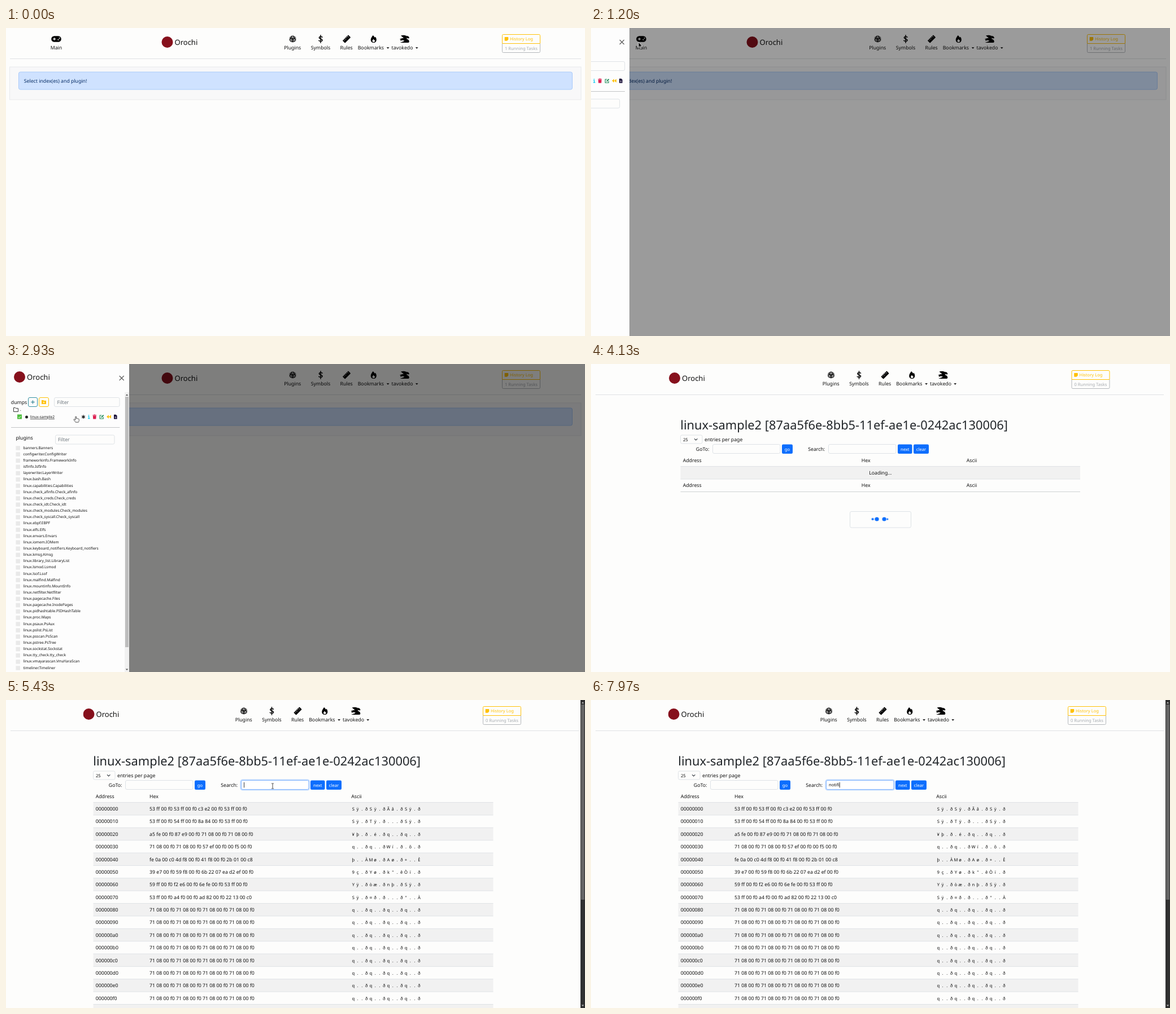
Write an HTML page that moves like this. It is 1025 px wide and 546 px high and loops after 8000 ms.

```html
<!DOCTYPE html>
<html lang="en">
<head>
<meta charset="utf-8">
<title>Memory dump viewer</title>
<style>
  html, body { margin: 0; width: 100%; height: 100%; overflow: hidden; background: #fdfdfc; }
  svg { display: block; width: 1025px; height: 546px; }
  text { font: 8.73px "Noto Sans", sans-serif; fill: #111; white-space: pre; text-rendering: geometricPrecision; }
  .mid { text-anchor: middle; }
  .small { font-size: 7.64px; }
  .tiny { font-size: 6.55px; }
  .hint { fill: #6c757d; }
  .title { font-size: 21.83px; font-weight: 500; fill: #212529; }
  .brand { font-size: 13px; }
  .box { fill: #fdfdfc; stroke: #dee2e6; }
  .blue { fill: #0d6efd; }
  .white { fill: #fff; }
  .line { fill: none; stroke: #dfe2e5; }

  .step, .move { animation: 8s step-end infinite; }
  .move { animation-timing-function: linear; }
  .viewA { animation-name: viewA; }
  .viewB { animation-name: viewB; }
  .loading { animation-name: loading; }
  .loaded { animation-name: loaded; }
  .nudge { animation-name: nudge; }
  .checked { animation-name: checked; }
  .listed { animation-name: listed; }
  .aside { animation-name: aside; }
  .fit { animation-name: fit; }
  .main { animation-name: hover; }
  .shade { animation-name: shade; }
  .panel { animation-name: slide; }
  .focus { animation-name: focus; }
  .caret { animation-name: caret; }
  .key { animation-name: key; animation-delay: calc(var(--t) - 8s); }
  .pointer { animation-name: travel; }
  .arrow { animation-name: arrow; }
  .hand { animation-name: hand; }
  .beam { animation-name: beam; }
  .grow, .shrink { transform-box: fill-box; transform-origin: center; }
  .grow { animation-name: grow; }
  .shrink { animation-name: grow; animation-direction: normal; animation-name: shrink; }
  .hop { animation-name: hop; }

  @keyframes viewA { 0% { opacity: 1 } 45%, 100% { opacity: 0 } }
  @keyframes viewB { 0% { opacity: 0 } 45%, 100% { opacity: 1 } }
  @keyframes loading { 0% { opacity: 1 } 57.5%, 100% { opacity: 0 } }
  @keyframes loaded { 0% { opacity: 0 } 57.5%, 100% { opacity: 1 } }
  @keyframes nudge { 0% { transform: none } 57.5%, 100% { transform: translateX(var(--d)) } }
  @keyframes checked { 0% { opacity: 0 } 25.6%, 100% { opacity: 1 } }
  @keyframes listed { 0% { opacity: 0 } 29%, 100% { opacity: 1 } }
  @keyframes aside { 0% { transform: translateX(9px) } 29%, 100% { transform: none } }
  @keyframes fit { 0% { width: var(--w) } 29%, 100% { width: calc(var(--w) - 8.7px) } }
  @keyframes hover { 0%, 11.8% { opacity: 1 } 13.2%, 13.6% { opacity: .8 } 15%, 100% { opacity: 1 } }
  @keyframes shade { 0%, 13.56% { opacity: 0 } 15.44%, 100% { opacity: .5 } }
  @keyframes slide {
    0%, 13.56% { transform: translateX(-218px); animation-timing-function: ease-in-out }
    17.31%, 100% { transform: none }
  }
  @keyframes focus { 0%, 66.2% { opacity: 0 } 67.8%, 100% { opacity: 1 } }
  @keyframes caret {
    0% { opacity: 0; transform: none }
    66.25% { opacity: 1 }
    72.5% { opacity: 0 }
    78.75% { opacity: 1; transform: none }
    84.4% { transform: translateX(4.7px) }
    86.9% { transform: translateX(9.3px) }
    89.4% { transform: translateX(12.1px) }
    92.5% { transform: translateX(14.1px) }
    95.6% { transform: translateX(16.7px) }
    98.1%, 100% { opacity: 1; transform: translateX(18.7px) }
  }
  @keyframes key { 0% { fill-opacity: 1 } 16%, 100% { fill-opacity: 0 } }
  @keyframes travel {
    0%, 8% { transform: translate(150px, -25px); animation-timing-function: ease-in-out }
    12.4%, 18.5% { transform: translate(84px, 25px); animation-timing-function: ease-in-out }
    24.5%, 29% { transform: translate(24px, 94px); animation-timing-function: ease-in-out }
    36.2% { transform: translate(122px, 93px) }
    40%, 45% { transform: translate(137px, 93px) }
    45.01%, 59% { transform: translate(330px, -25px); animation-timing-function: ease-in-out }
    65.6%, 100% { transform: translate(472px, 152px) }
  }
  @keyframes arrow { 0% { opacity: 1 } 23.6% { opacity: 0 } 45% { opacity: 1 } 64.3%, 100% { opacity: 0 } }
  @keyframes hand { 0% { opacity: 0 } 23.6% { opacity: 1 } 45%, 100% { opacity: 0 } }
  @keyframes beam { 0% { opacity: 0 } 64.3% { opacity: 1 } 84.4%, 100% { opacity: 0 } }
  @keyframes grow {
    0%, 45.3%, 52.8% { transform: scale(0); animation-timing-function: cubic-bezier(0, 1, 1, 0) }
    52.79%, 60.3%, 100% { transform: none }
  }
  @keyframes shrink {
    0%, 45.3%, 52.8% { transform: none; animation-timing-function: cubic-bezier(0, 1, 1, 0) }
    52.79%, 60.3%, 100% { transform: scale(0) }
  }
  @keyframes hop {
    0%, 45.3%, 52.8% { transform: none; animation-timing-function: cubic-bezier(0, 1, 1, 0) }
    52.79%, 60.3%, 100% { transform: translateX(13.1px) }
  }
</style>
</head>
<body>
<svg viewBox="0 0 1025 546">
  <defs>
    <g id="logo">
      <circle cx="10" cy="16" r="10" fill="#86101c"/>
      <text class="brand" x="23" y="21">Orochi</text>
    </g>
    <g id="nav">
      <path d="M507.5 13l5.7 3.2v6.6l-5.7 3.2-5.7-3.2v-6.6z"/>
      <path d="M507.5 13v3l-3.2 5.6h6.4l-3.2-5.6M501.8 16.4l5.7-.4 5.7.4M501.8 22.6l2.5-1 3.2 4.4 3.2-4.4 2.5 1M501.8 16.4l2.5 5.2M513.2 16.4l-2.5 5.2" fill="none" stroke="#fdfdfc" stroke-width=".7"/>
      <path d="M560 16.2c-1.2-1.2-5.4-1.6-5.6.8-.2 2.700 5.800 1.800 5.600 4.800-.2 2.300-4.800 2-6.200.5M557 12.800v13.400" fill="none" stroke="#000" stroke-width="1.5" stroke-linecap="round"/>
      <g transform="rotate(-45 603 19.500)">
        <rect x="595.800" y="16.400" width="14.400" height="6.200" rx="1"/>
        <path d="M598.500 16.400v2.500M601.500 16.400v3.200M604.500 16.400v2.500M607.500 16.400v3.200" stroke="#fdfdfc" stroke-width=".8"/>
      </g>
      <path fill-rule="evenodd" d="M649.500 13c2 1.500 2.800 3 3.300 4l1-1.400c1.300 1.600 2 3.500 2 5.300 0 3-2.200 5.100-5 5.100s-5.100-2.100-5.100-5.100c0-2.400 2-5.300 3.800-7.900zM650.800 19.500c-1.400 1.500-2.300 2.400-2.300 3.500 0 1.200 1 1.900 2.300 1.900s2.400-.8 2.300-2.200c0-.6-.3-1.100-.5-1.500l-.8.9z"/>
      <path fill-rule="evenodd" d="M699 13.500c3-1 7-.8 9 .2l4 .8 2 2.600-.8 1.400-3.200-.4-1.200.9c3.300 1 5 2.700 5 5 0 1-.7 2-1.800 2h-14.400c3.400-1.700 6.700-2 7.700-3.600-3-1.200-5.800-.4-7.300.8l.8-2.700-2-.5c2.600-1.900 5-2.200 7.100-2.100-1.600-2.100-3.500-3.100-4.900-4.400zM709 15.400v.9h1.400z"/>
      <text class="mid" x="507.200" y="38.200">Plugins</text>
      <text class="mid" x="557" y="38.200">Symbols</text>
      <text class="mid" x="602.700" y="38.200">Rules</text>
      <text x="622.700" y="38.200">Bookmarks</text>
      <text x="682.500" y="38.200">tavokedo</text>
      <path d="M673.700 34.200h4.800l-2.400 2.600zM724.800 34.200h4.800l-2.400 2.600z"/>
    </g>
    <g id="status">
      <path d="M880.500 11.500h63a2 2 0 0 1 2 2v14h-67v-14a2 2 0 0 1 2-2z" fill="none" stroke="#ffc107"/>
      <path d="M878.500 27.500v14a2 2 0 0 0 2 2h63a2 2 0 0 0 2-2v-14" fill="none" stroke="#b3b7bb"/>
      <path d="M883.500 16h5a.8.800 0 0 1 .8.800v3.700l-2.300 2.300h-3.500a.8.800 0 0 1-.8-.8v-5.200a.8.800 0 0 1 .8-.8z" fill="#ffc107"/>
      <text class="small" x="892" y="22.300" style="fill:#ffc107">History Log</text>
    </g>
    <path id="tick" d="M21.800 94l1.500 1.500 3-3.200" fill="none" stroke="#fff"/>
  </defs>

  <g class="step viewA">
    <rect width="1025" height="546" fill="#fdfdfc"/>
    <path class="line" d="M7 54.500H1018"/>
    <g class="move main">
      <path fill-rule="evenodd" d="M85.500 14.200h7a5.300 5.300 0 0 1 0 10.600h-7a5.300 5.300 0 0 1 0-10.600zM84.900 17.200v1.600h-1.600v1.400h1.600v1.600h1.400v-1.600h1.600v-1.400h-1.600v-1.600zM92.400 19.700a1 1 0 0 0 0 2 1 1 0 0 0 0-2zM94.600 17.100a1 1 0 0 0 0 2 1 1 0 0 0 0-2z"/>
      <text class="mid" x="89" y="38.200">Main</text>
    </g>
    <use href="#logo" x="275.500" y="9"/>
    <use href="#nav"/>
    <use href="#status"/>
    <text class="small" x="883" y="38.900" style="fill:#a6abb0">1 Running Tasks</text>
    <rect x="6.500" y="69" width="1011.500" height="58" fill="#f8f8f9" stroke="#e8eaeb"/>
    <rect x="22.500" y="78" width="980" height="31" rx="3" fill="#cfe2ff" stroke="#a9cbfa"/>
    <text x="31.700" y="96.600" style="fill:#052c65">Select index(es) and plugin!</text>
    <rect class="move shade" width="1025" height="546"/>

    <g class="move panel">
      <rect width="218" height="546" fill="#fdfdfd"/>
      <use href="#logo" x="14" y="7"/>
      <path d="M200.700 21l8 8m0-8l-8 8" stroke="#555" stroke-width="1.100"/>
      <text x="8.800" y="70.600">dumps</text>
      <rect x="39.500" y="59.500" width="16" height="16" rx="2.500" fill="none" stroke="#3590a0"/>
      <path d="M44.200 67.500h6.600M47.500 64.200v6.600" stroke="#247b8c" stroke-width="1.100"/>
      <rect x="58.500" y="59.500" width="17" height="16" rx="2.500" fill="none" stroke="#ffc107"/>
      <path d="M63 64h3l1 1h4v6h-8z" fill="#ffc107"/>
      <path d="M67 66.400v3.200M65.400 68h3.200" stroke="#fff" stroke-width=".8"/>
      <rect class="box step fit" style="--w:124.200px" x="85.500" y="59.500" height="16" rx="2.500"/>
      <text class="hint" x="90.500" y="70.700">Filter</text>
      <path d="M13.500 77.500h3l1 1.200h4v5.800h-8z" fill="none" stroke="#222" stroke-width=".9"/>
      <text class="tiny" x="24.500" y="83.600">-</text>
      <rect x="20" y="89.500" width="8" height="8" fill="#e4e4e4"/>
      <g class="step checked">
        <rect x="20" y="89.500" width="8" height="8" fill="#4fbf3f"/>
        <use href="#tick"/>
      </g>
      <circle cx="36.500" cy="94" r="2.500" fill="#222"/>
      <text class="tiny" x="42.800" y="96.400" text-decoration="underline">linux-sample2</text>
      <g class="step aside">
        <path d="M137 90.300v6.800M134.100 92l5.800 3.400M139.900 92l-5.800 3.400" stroke="#111" stroke-width="1.200"/>
        <path d="M145.300 92.800h1.500v3.800m-1.700 0h3.400M146.500 90v1.500" fill="none" stroke="#0dcaf0" stroke-width="1.300"/>
        <path d="M153.400 90.200h2l.5-.7h1.700l.5.700h2v1h-6.700zM153.800 91.800h5.900l-.4 5.700h-5.100z" fill="#dc1f50"/>
        <path d="M169.500 91h-3.300v6h6v-3" fill="none" stroke="#198754" stroke-width="1.100"/>
        <path d="M168.300 95.200l.4-1.700 3.300-3.500 1.300 1.300-3.300 3.500z" fill="#198754"/>
        <path d="M182 90.300v6.400l-3.900-3.200zM186 90.300v6.400l-3.900-3.200z" fill="#ffc107"/>
        <path d="M191 89.800h3.600l2 2v5.700H191z" fill="#180f38"/>
        <path d="M193.800 92.600v3m-1.300-1.200l1.300 1.300 1.300-1.300" fill="none" stroke="#fff" stroke-width=".7"/>
      </g>
      <rect class="step fit" style="--w:201px" x="9" y="112" height="1" fill="#c2c4c6"/>
      <text x="17.500" y="134">plugins</text>
      <rect class="box step fit" style="--w:113.200px" x="87.500" y="126" height="16" rx="2.500"/>
      <text class="hint" x="92" y="137.200">Filter</text>
      <g class="step listed">
        <g id="plugins"></g>
        <rect x="210" y="50" width="8" height="496" fill="#f1f1f1"/>
        <rect x="211" y="58" width="6" height="444" fill="#bdbdbd"/>
        <path d="M211.700 56h4.600l-2.300-2.600zM211.700 540.500h4.600l-2.300 2.600z" fill="#555"/>
      </g>
    </g>
  </g>

  <g class="step viewB">
    <rect width="1025" height="546" fill="#fdfdfc"/>
    <path class="line" d="M8 54.500H1014"/>
    <g class="step nudge" style="--d:-1.500px"><use href="#logo" x="138" y="9"/></g>
    <g class="step nudge" style="--d:-4px"><use href="#nav" x="-82.500"/></g>
    <g class="step nudge" style="--d:-6.500px">
      <use href="#status" x="-27.500"/>
      <text class="small" x="855.500" y="38.900" style="fill:#a6abb0">0 Running Tasks</text>
    </g>
    <g class="step nudge" style="--d:-4px">
      <text class="title" x="158.300" y="115.600">linux-sample2 [87aa5f6e-8bb5-11ef-ae1e-0242ac130006]</text>
      <rect class="box" x="158.500" y="126" width="38.500" height="15" rx="2.500"/>
      <text class="small" x="163" y="136.500">25</text>
      <path d="M183 132.300l2.700 2.700 2.700-2.700" fill="none" stroke="#343a40" stroke-width="1.100"/>
      <text x="201" y="136.600">entries per page</text>
      <text x="185.800" y="153.600">GoTo:</text>
      <rect class="box" x="215.500" y="142.500" width="119.500" height="16" rx="2.500"/>
      <text x="384.200" y="153.600">Search:</text>
      <rect class="box" x="420.500" y="142.500" width="119.500" height="16" rx="2.500"/>
      <g class="move focus">
        <rect x="419.500" y="141.500" width="121.500" height="18" rx="3.500" fill="none" stroke="#c2dbfe" stroke-width="2.200"/>
        <rect x="420.500" y="142.500" width="119.500" height="16" rx="2.500" fill="#fff" stroke="#86b7fe"/>
      </g>
      <text id="query" class="small" x="425" y="153.400"></text>
      <rect class="step caret" x="425" y="145.800" width=".9" height="9.600" fill="#222"/>
      <g id="buttons"></g>
      <text x="162.700" y="173.700">Address</text>
    </g>
    <g class="step loading">
      <text x="478.800" y="173.700">Hex</text>
      <text x="664.800" y="173.700">Ascii</text>
      <rect x="158.500" y="181.500" width="707.500" height="22.500" fill="#f1f1f1"/>
      <path class="line" d="M158.500 181.500H866M158.500 204H866"/>
      <text class="mid" x="512.300" y="196">Loading...</text>
      <text x="162.700" y="218.400">Address</text>
      <text x="478.800" y="218.400">Hex</text>
      <text x="664.800" y="218.400">Ascii</text>
      <path d="M158.500 226.500H866" stroke="#cfd2d4"/>
      <rect class="box" x="458.500" y="261.500" width="108" height="28.500" rx="2.500"/>
      <g class="blue">
        <circle class="move grow" cx="498.600" cy="275" r="3.600"/>
        <circle class="move hop" cx="498.600" cy="275" r="3.600"/>
        <circle class="move hop" cx="511.700" cy="275" r="3.600"/>
        <circle class="move shrink" cx="524.800" cy="275" r="3.600"/>
      </g>
    </g>
    <g class="step loaded">
      <text x="254" y="173.700">Hex</text>
      <text x="611.300" y="173.700">Ascii</text>
      <g id="rows"></g>
      <rect x="1017" width="8" height="546" fill="#303030"/>
      <rect x="1018" y="8" width="6" height="346" fill="#656565"/>
      <path d="M1018.700 6h4.600l-2.300-2.600zM1018.700 540.500h4.600l-2.300 2.600z" fill="#bbb"/>
    </g>
  </g>

  <g class="move pointer">
    <path class="step arrow" d="M0 0v9.600l2.200-2 1.500 3.300 1.600-.7-1.500-3.200h3.100z" fill="#111" stroke="#fff" stroke-width=".7"/>
    <path class="step hand" d="M-.9.800c0-1.200 1.700-1.200 1.700 0v3c.3-.7 1.500-.6 1.700.1.500-.5 1.500-.3 1.600.5.700-.4 1.400.1 1.400.8v2c0 1.500-1 2-1 3h-5.200c-.4-1.500-2.300-2.500-3-4.500-.3-.9.700-1.300 1.400-.6l1.400 1.200z" fill="#fff" stroke="#222" stroke-width=".8"/>
    <path class="step beam" d="M-2-4h1.500l.5.400.5-.4H2M-2 5h1.500l.5-.4.5.4H2M0-3.600v8.200" fill="none" stroke="#333" stroke-width=".9"/>
  </g>
</svg>
<script>
  const fill = (id, parts) => { document.getElementById(id).innerHTML = parts.join(''); };
  const text = (x, y, str, cls = '') => `<text class="${cls}" x="${x}" y="${y}">${str}</text>`;

  const linux = `bash.Bash capabilities.Capabilities check_afinfo.Check_afinfo check_creds.Check_creds
    check_idt.Check_idt check_modules.Check_modules check_syscall.Check_syscall ebpf.EBPF elfs.Elfs
    envars.Envars iomem.IOMem keyboard_notifiers.Keyboard_notifiers kmsg.Kmsg library_list.LibraryList
    lsmod.Lsmod lsof.Lsof malfind.Malfind mountinfo.MountInfo netfilter.Netfilter pagecache.Files
    pagecache.InodePages pidhashtable.PIDHashTable proc.Maps psaux.PsAux pslist.PsList psscan.PsScan
    pstree.PsTree sockstat.Sockstat tty_check.tty_check vmayarascan.VmaYaraScan`.split(/\s+/);
  const plugins = ['banners.Banners', 'configwriter.ConfigWriter', 'frameworkinfo.FrameworkInfo',
    'isfinfo.IsfInfo', 'layerwriter.LayerWriter', ...linux.map(p => 'linux.' + p), 'timeliner.Timeliner'];
  fill('plugins', plugins.map((name, i) => {
    const y = 148.5 + i * 11.14;
    return `<rect x="17.5" y="${y - 3.2}" width="7.5" height="7.5" fill="#e9e9e9"/>` + text(30.5, y + 2.2, name, 'tiny');
  }));

  fill('buttons', [['go', 338, 19], ['next', 543, 25.5], ['clear', 571, 27]].map(([label, x, w]) =>
    `<rect class="blue" x="${x}" y="142.500" width="${w}" height="16.500" rx="2.200"/>` +
    text(x + w / 2, 153.600, label, 'mid small white')));

  const times = [6.75, 6.95, 7.15, 7.4, 7.65, 7.85];
  fill('query', [...'notifi'].map((c, i) => `<tspan class="step key" style="--t:${times[i]}s">${c}</tspan>`));

  const dump = [
    '53 ff 00 f0 53 ff 00 f0 c3 e2 00 f0 53 ff 00 f0',
    '53 ff 00 f0 54 ff 00 f0 8a 84 00 f0 53 ff 00 f0',
    'a5 fe 00 f0 87 e9 00 f0 71 08 00 f0 71 08 00 f0',
    '71 08 00 f0 71 08 00 f0 57 ef 00 f0 00 f5 00 f0',
    'fe 0a 00 c0 4d f8 00 f0 41 f8 00 f0 2b 01 00 c8',
    '39 e7 00 f0 59 f8 00 f0 6b 22 07 ea d2 ef 00 f0',
    '59 ff 00 f0 f2 e6 00 f0 6e fe 00 f0 53 ff 00 f0',
    '53 ff 00 f0 a4 f0 00 f0 ad 82 00 f0 22 13 00 c0'
  ];
  const repeat = Array(4).fill('71 08 00 f0').join(' ');
  const printable = c => (c > 32 && c < 127) || (c > 160 && c !== 173);
  const ascii = hex => hex.split(' ').map(h => parseInt(h, 16))
    .map(c => printable(c) ? String.fromCharCode(c) : '.').join('');
  const cells = Array.from({ length: 16 }, (_, i) => 614.8 + i * 7.77).join(' ');

  fill('rows', Array.from({ length: 17 }, (_, i) => {
    const top = 181.6 + i * 22.37, base = top + 14.5, hex = dump[i] || repeat;
    return `<rect x="154.500" y="${top}" width="708" height="22.370" fill="${i % 2 ? '#fdfdfc' : '#f1f1f1'}"/>` +
      `<path class="line" d="M154.500 ${top}h708"/>` +
      text(158.7, base, (i * 16).toString(16).padStart(8, '0')) +
      text(254, base, hex) + text(cells, base, ascii(hex), 'mid small');
  }));
</script>
</body>
</html>
```
